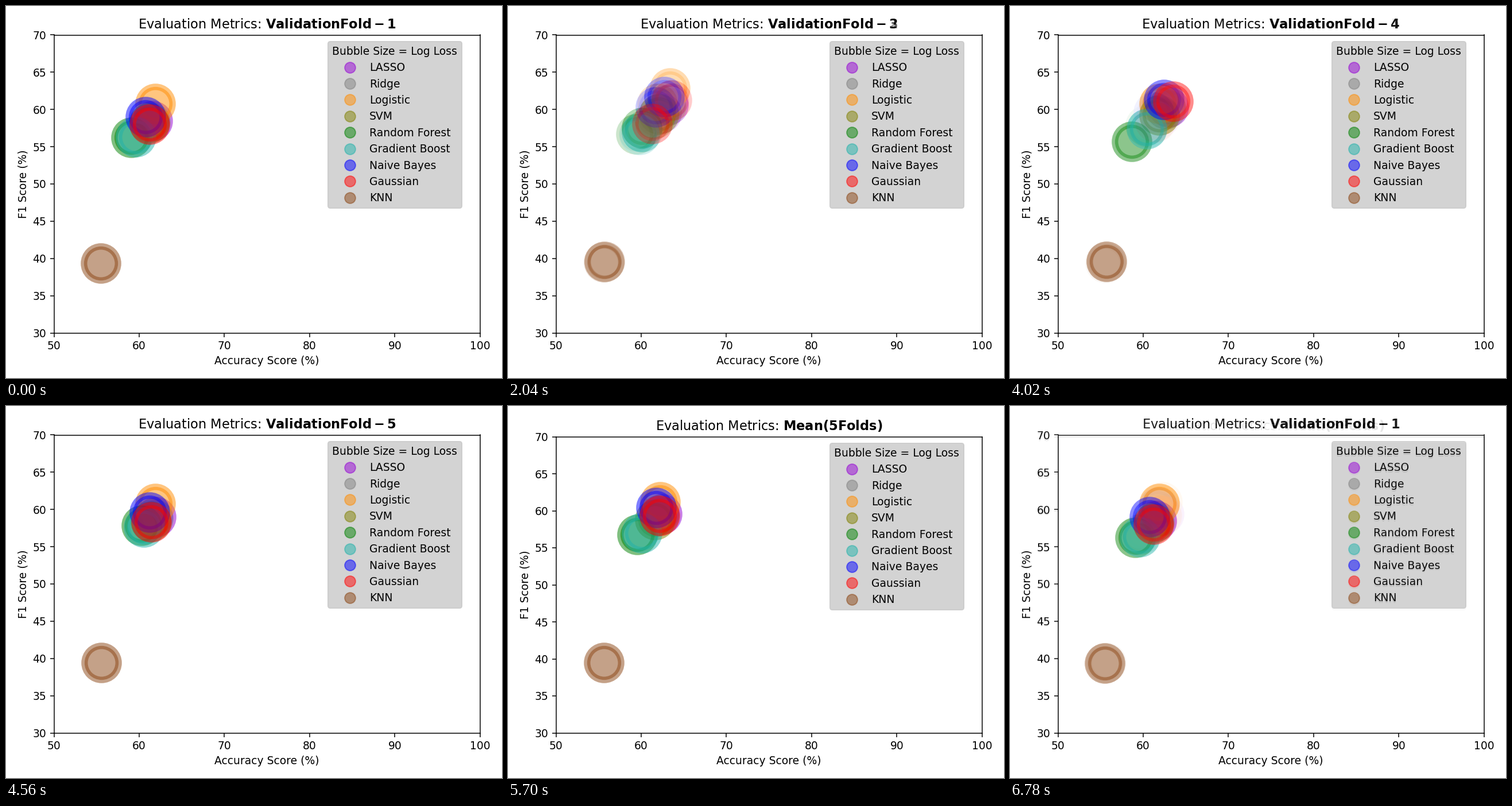
These frames come from a looping animation (864x648 px, 6.84 s). A matplotlib script:

```python
import numpy as np
import matplotlib.pyplot as plt
from matplotlib.animation import FuncAnimation
from matplotlib.lines import Line2D

W, H, DPI = 864, 648, 135
HOLD, FADE = 10, 9          # ticks a page rests, ticks of cross-fade
TICK = 60                   # ms
PERIOD = HOLD + FADE
FOLDS = 5
ALPHA = 0.5
F1_GAIN = 1.35              # F1 swings a little wider than accuracy

# How a score swings from fold to fold: (period, fold of the peak)
SLOW = 5, 2.3
PEAKY = 3, 2
RISING = 10, 4.5
QUICK = 2.5, 1.66
FLIPPING = 2.1, 1.05

# name, colour, mid accuracy, mid F1, swing, rhythm
MODELS = [
    ("LASSO", "darkviolet", 62.4, 59.6, 0.85, SLOW),
    ("Ridge", "gray", 62.1, 59.4, 0.85, SLOW),
    ("Logistic", "darkorange", 62.4, 61.5, 1.0, PEAKY),
    ("SVM", "olive", 61.6, 58.8, 0.5, SLOW),
    ("Random Forest", "green", 59.5, 56.8, 0.85, QUICK),
    ("Gradient Boost", "lightseagreen", 60.1, 57.0, 0.5, RISING),
    ("Naive Bayes", "blue", 61.75, 60.4, 1.05, SLOW),
    ("Gaussian", "red", 62.4, 59.65, 1.2, FLIPPING),
    ("KNN", "saddlebrown", 55.6, 39.5, 0.1, SLOW),
]

plt.rcParams["font.family"] = "DejaVu Sans"
fig = plt.figure(figsize=(W / DPI, H / DPI), dpi=DPI, facecolor="white")


def fold_scores(fold):
    """Accuracy and F1 of every model in one fold."""
    points = []
    for _, _, accuracy, f1, swing, (period, peak) in MODELS:
        shift = swing * np.cos(2 * np.pi * (fold - peak) / period)
        points.append((accuracy + shift, f1 + F1_GAIN * shift))
    return np.array(points)


def draw_page(title, points, top):
    """Draw one chart page and return it as a float RGBA image."""
    fig.clear()
    left, right, bottom = 83.5, 825.7, 569.5
    ax = fig.add_axes([left / W, 1 - bottom / H,
                       (right - left) / W, (bottom - top) / H])
    handles = []
    for (name, color, *_), (x, y) in zip(MODELS, points):
        ax.scatter(x, y, s=1000, c=color, edgecolors=color,
                   linewidths=6, alpha=ALPHA)
        handles.append(Line2D([], [], color=color, marker="o", markersize=10,
                              linestyle="none", alpha=ALPHA, label=name))
    ax.set_xlim(50, 100)
    ax.set_ylim(30, 70)
    ax.set_xlabel("Accuracy Score (%)")
    ax.set_ylabel("F1 Score (%)")
    ax.set_title(r"Evaluation Metrics: $\bf{%s}$" % title)
    ax.legend(handles=handles, title="Bubble Size = Log Loss",
              loc="upper right", bbox_to_anchor=(0.957, 0.977),
              borderaxespad=0, facecolor="lightgray", framealpha=1)
    fig.canvas.draw()
    return np.array(fig.canvas.buffer_rgba(), dtype=float)


scores = [fold_scores(k) for k in range(FOLDS)]
pages = [draw_page("ValidationFold - %d" % (k + 1), points, 50.5)
         for k, points in enumerate(scores)]
pages.append(draw_page("Mean (5Folds)", np.mean(scores, axis=0), 53.5))

fig.clear()
screen = fig.figimage(pages[0].astype(np.uint8))


def update(tick):
    k, step = divmod(tick, PERIOD)
    mix = max(0, step - HOLD + 1) / (FADE + 1)
    following = pages[(k + 1) % len(pages)]
    image = (1 - mix) * pages[k] + mix * following
    screen.set_data(np.rint(image).astype(np.uint8))
    return [screen]


anim = FuncAnimation(fig, update, frames=PERIOD * len(pages), interval=TICK,
                     repeat=True, repeat_delay=0)
plt.show()
```
